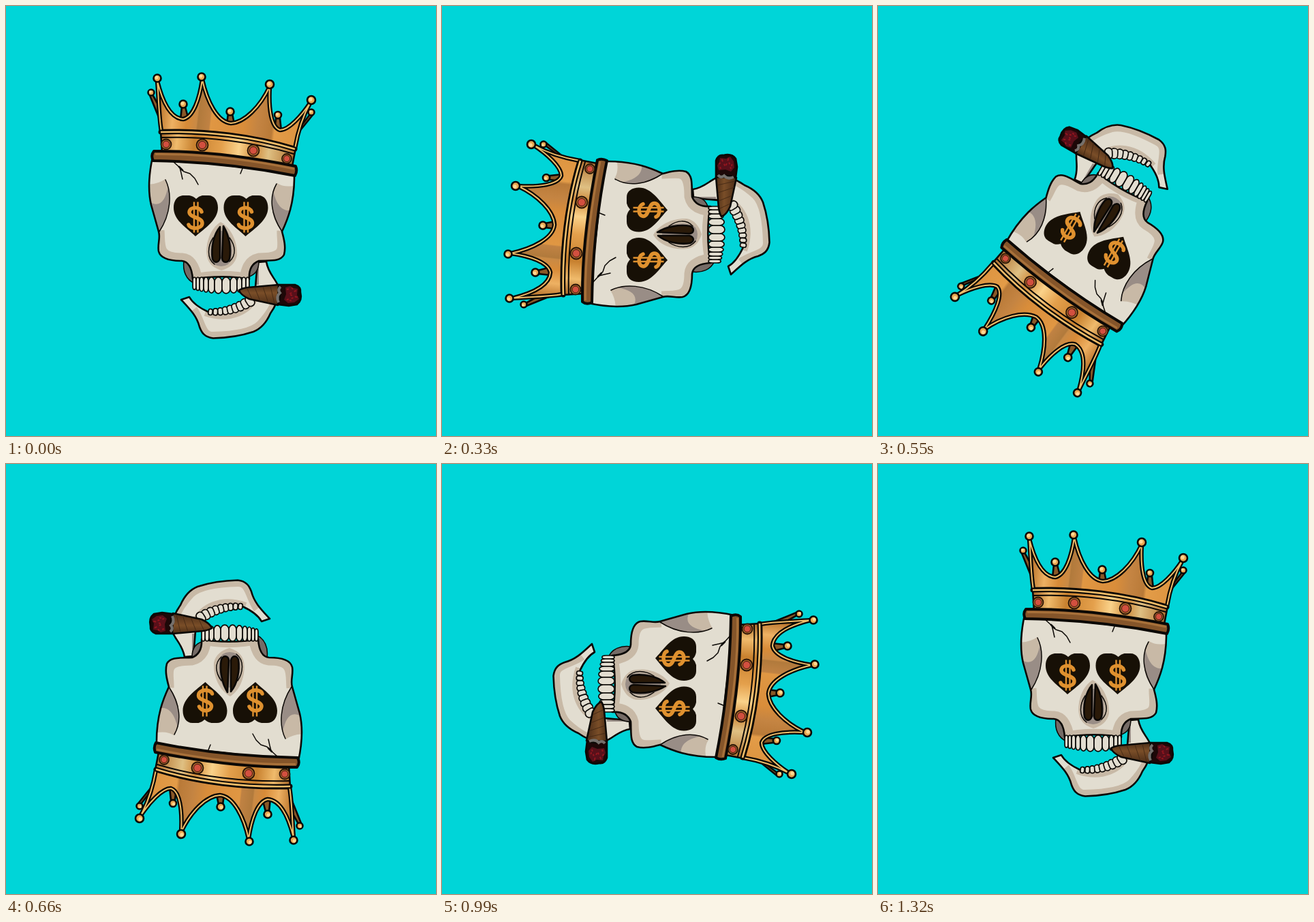
Write an HTML page that moves like this. It is 631 px wide and 631 px high and loops after 1430 ms.

```html
<!DOCTYPE html>
<html lang="en">
<head>
<meta charset="utf-8">
<title>Spinning skull</title>
<style>
  html, body { margin: 0; height: 100%; overflow: hidden; background: #00d5d8; }
  svg { display: block; width: 100vw; height: 100vh; }
  .ink { fill: none; stroke: #0b0805; stroke-width: 2.6; stroke-linecap: round; stroke-linejoin: round; }
  .thin { stroke-width: 1.5; }
  .bone { fill: #e2ddd0; }
  .tan { fill: #c8b9a6; }
  .grey { fill: #998d86; }
  .shade { fill: none; stroke: #c8b9a6; }
  .rim { fill: none; stroke: #f0bc68; }
</style>
</head>
<body>
<svg viewBox="0 0 631 631">
  <defs>
    <linearGradient id="gold" gradientUnits="userSpaceOnUse" x1="224" y1="160" x2="432" y2="184">
      <stop offset="0" stop-color="#b9742c"/>
      <stop offset=".1" stop-color="#eeb163"/>
      <stop offset=".2" stop-color="#d88b38"/>
      <stop offset=".27" stop-color="#c98a45"/>
      <stop offset=".28" stop-color="#b17a3c"/>
      <stop offset=".36" stop-color="#c08243"/>
      <stop offset=".37" stop-color="#e09743"/>
      <stop offset=".6" stop-color="#d98d3a"/>
      <stop offset=".7" stop-color="#c48442"/>
      <stop offset=".8" stop-color="#b97a38"/>
      <stop offset=".82" stop-color="#e39c48"/>
      <stop offset="1" stop-color="#dd9440"/>
    </linearGradient>
    <linearGradient id="band" gradientUnits="userSpaceOnUse" x1="227" y1="195" x2="425" y2="218">
      <stop offset="0" stop-color="#a9692a"/>
      <stop offset=".12" stop-color="#f0bb6c"/>
      <stop offset=".25" stop-color="#c8812f"/>
      <stop offset=".45" stop-color="#e4a04c"/>
      <stop offset=".58" stop-color="#fad28a"/>
      <stop offset=".7" stop-color="#cf8b3c"/>
      <stop offset=".8" stop-color="#dfc083"/>
      <stop offset="1" stop-color="#b06f2d"/>
    </linearGradient>
    <linearGradient id="leaf" x1="0" y1="0" x2="0" y2="1">
      <stop offset="0" stop-color="#4a2d16"/>
      <stop offset=".4" stop-color="#7a4e28"/>
      <stop offset="1" stop-color="#4a2c17"/>
    </linearGradient>
    <path id="face" d="M215 222C209 250 209 275 213 292L224 331C227 340 222 350 224 360C227 372 246 374 258 374C268 375 273 386 274 401C300 396 335 396 357 401C356 386 361 378 371 374C386 373 402 376 408 365C411 354 408 342 405 331C412 316 424 290 423 245Z"/>
    <path id="jaw" d="M257 431Q263 429 269 427C275 438 286 444 297 449C325 455 350 447 362 430C368 420 365 402 370 376L382 375C385 396 401 403 401 420C399 434 393 444 388 451C382 465 373 474 363 478C345 484 325 487 304 487.500C291 486 287 479 284 471C280 455 270 445 257 431Z"/>
    <path id="spikes" d="M222 110C224 130 224 160 228 184C292 182 362 190 424 209C428 186 434 164 447 141C434 161 415 182 402 182C389 178 385 150 387 118C373 148 350 171 330 172C310 170 295 140 288 108C284 136 275 163 260 166C242 165 230 142 222 110Z"/>
    <clipPath id="inFace"><use href="#face"/></clipPath>
    <clipPath id="inJaw"><use href="#jaw"/></clipPath>
    <g id="eye">
      <path fill="#171006" d="M278 338C266 326 246 315 246 296C246 285 252 278 261 278H269Q275 279 279 283Q283 279 288 278H297C306 278 311 286 311 296C311 314 292 326 278 338Z"/>
      <g fill="none" stroke="#df912f">
        <path stroke-width="5.500" stroke-linecap="round" d="M287 302C284 294 269 294 269 303C270 311 288 310 288 318.500C288 328 270 328 268 321"/>
        <path stroke-width="2.400" d="M276 287.500V332.500M281.500 287.500V332.500"/>
      </g>
    </g>
  </defs>

  <g id="skull">
    <use href="#jaw" class="bone"/>
    <g clip-path="url(#inJaw)">
      <path class="shade" stroke-width="20" d="M272 448C283 462 283 489 304 488C345 487 366 480 376 470C390 455 402 437 402 418"/>
      <path class="shade" stroke-width="8" d="M292 451C330 464 357 448 367 427"/>
      <path class="grey" d="M366 374H371V409H366Z"/>
    </g>
    <use href="#jaw" class="ink"/>
    <g id="lower" class="bone"></g>

    <path fill="#756b66" stroke="#0b0805" stroke-width="1.500" d="M261 374C259 388 264 402 277 407L280 385ZM354 378L371 375C371 386 366 394 357 397Z"/>

    <use href="#face" class="bone"/>
    <g clip-path="url(#inFace)">
      <path class="tan" d="M234 254C244 275 242 305 225 331L205 300V262Q222 262 234 254ZM398 260C386 280 388 305 405 331L430 300V262Q410 268 398 260Z"/>
      <path class="grey" d="M238 264C243 295 236 314 225 331L211 288C226 296 234 286 238 264ZM392 270C387 300 393 316 405 331L419 300C404 302 396 290 392 270Z"/>
      <path class="shade" stroke-width="25" d="M220 330C222 350 215 375 258 375C270 376 274 390 276 404M410 330C409 350 422 375 372 375C358 378 357 390 354 404"/>
      <path class="shade" stroke-width="10" d="M272 399C300 392 335 392 359 399"/>
      <path class="tan" d="M315 317C300 326 292 348 295 367C297 380 307 385 316 388C327 385 337 378 339 366C340 346 331 326 315 317Z"/>
      <path class="grey" d="M309 330C299 345 297 371 305 379Q316 385 326 379C335 369 333 344 324 330Z"/>
      <path class="ink thin" d="M234 255C244 275 242 305 225 331M397 261C386 280 388 305 405 331"/>
    </g>
    <use href="#face" class="ink"/>
    <path class="ink thin" d="M304 340C296 352 294 370 306 379M328 340C337 352 338 366 328 375"/>
    <path class="ink" style="fill:#2a1a09" d="M314 324C304 336 301 355 303 371C306 378 312 377 314 370ZM319 323C327 336 331 355 328 371C325 378 318 377 317 370Z"/>
    <path class="ink thin" d="M246 229L256 238L261 243L270 246L277 253L282 262M255 237L257 245L259 254M348 236L344 246"/>
    <path class="ink" d="M254 236L259 241"/>
    <use href="#eye"/>
    <use href="#eye" x="73.500"/>
    <g id="upper" class="bone"></g>

    <g id="cigar">
      <path class="ink" style="fill:url(#leaf)" d="M342 417Q347 414 355 413L400 409L399 439L357 430Q344 424 342 417Z"/>
      <path fill="none" stroke="#3f2613" stroke-width=".8" d="M354 415L361 430M365 413L373 433M377 412L385 436M388 411L394 437"/>
      <path class="ink" style="fill:#1d0808" d="M400 409L424 409Q433 412 432 420Q435 432 427 438L415 440L399 438Q405 424 400 409Z"/>
      <path fill="none" stroke="#75706c" stroke-width="4" d="M403 412Q398 416 402 421Q396 426 400 435"/>
      <path fill="#58101a" d="M410 413L417 411L422 414L428 415L427 424L430 430L423 435L414 436L408 431L411 423Z"/>
      <path fill="none" stroke="#94161f" stroke-width="2" stroke-dasharray="3 4" d="M412 416L419 414L425 418L415 423L426 427L412 431L421 433"/>
    </g>

    <path class="ink" style="fill:#8a5827" d="M211 131L226 168L225 148L215 130ZM258 148L256 167H268L263 148ZM326 158L324 173H335L332 158ZM396 165L394 184L404 183L402 165ZM446 159L425 187L433 181L450 160Z"/>
    <g id="backBalls"></g>
    <path class="ink" style="fill:url(#band)" d="M227 184C292 182 362 190 425 209L419 240C350 225 285 217 229 216Z"/>
    <use href="#spikes" class="ink" style="stroke-width:6.500;fill:url(#gold)"/>
    <use href="#spikes" class="rim" stroke-width="2"/>
    <path class="ink" style="stroke-width:7" d="M227 185C292 183 362 191 424 210"/>
    <path class="rim" stroke-width="2.600" d="M227 185C292 183 362 191 424 210"/>
    <path class="ink" style="stroke-width:2" d="M228 193C292 191 362 199 422 217"/>
    <path class="ink" style="fill:#85552a;stroke-width:4" d="M217 213C285 212 350 220 425 235Q428 242 424 249C350 234 285 228 216 227Q212 219 217 213Z"/>
    <path fill="none" stroke="#a8713a" stroke-width="3" d="M219 217.500C285 216.500 350 224.500 423 239"/>
    <g id="frontBalls"></g>
    <g id="jewels"></g>
  </g>
</svg>
<script>
  const get = id => document.getElementById(id);
  const fill = (id, items, draw) => { get(id).innerHTML = items.map(draw).join(''); };

  const ball = ([x, y, r]) =>
    `<circle cx="${x}" cy="${y}" r="${r}" fill="#e8a650" stroke="#0b0805" stroke-width="2.6"/>
     <circle cx="${x - 1}" cy="${y - 1}" r="${r * 0.45}" fill="#ffd894"/>`;
  fill('backBalls', [[213, 127, 4.5], [260, 144, 5.5], [329, 155, 5.5], [399, 160, 5], [448, 156, 4.5]], ball);
  fill('frontBalls', [[222, 106, 5.5], [287, 104, 5.5], [387, 115, 6], [448, 138, 6]], ball);

  fill('jewels', [[235, 203, 7.5], [288, 204, 8.5], [363, 212, 8.5], [412, 224, 7]], ([x, y, r]) =>
    `<circle cx="${x}" cy="${y}" r="${r}" fill="#a8662c" stroke="#2a1608" stroke-width="1.8"/>
     <circle cx="${x}" cy="${y}" r="${r * 0.65}" fill="#d2503f" stroke="#45180f" stroke-width="1"/>`);

  const tooth = (x, y, w, h, turn = 0) =>
    `<rect x="${x - w / 2}" y="${y - h / 2}" width="${w}" height="${h}" rx="${w * 0.5}" ry="${h * 0.3}"
      transform="rotate(${turn} ${x} ${y})" stroke="#0b0805" stroke-width="1.7"/>`;

  const edges = [274, 279, 284, 290, 297, 306, 317, 329, 339, 346, 352, 357];
  fill('upper', edges.slice(1), (right, i) => {
    const left = edges[i], x = (left + right) / 2;
    const top = 398, bottom = 422 - ((x - 318) / 42) ** 2 * 6;
    return tooth(x, (top + bottom) / 2, right - left, bottom - top);
  });

  fill('lower', [...Array(9).keys()], i => {
    const u = i / 8, x = 300 + 58 * u;
    return tooth(x, 449 - 16 * u ** 2.2, 6 + 5 * u, 9 + 7 * u, 8 - 40 * u);
  });

  // Twelve 30° steps per turn; oblique poses sit slightly off the pivot.
  const STEP = 110, POSES = 13;
  const nudge = { 0: '0 0', 30: '4.5 4.5', 60: '7 5' };
  function frame() {
    const angle = -30 * (Math.floor(performance.now() / STEP) % POSES);
    const tilt = (angle % 90 + 90) % 90;
    get('skull').setAttribute('transform',
      `translate(322 329) rotate(${angle - tilt}) translate(${nudge[tilt]}) rotate(${tilt}) translate(-322 -329)`);
    requestAnimationFrame(frame);
  }
  frame();
</script>
</body>
</html>
```
